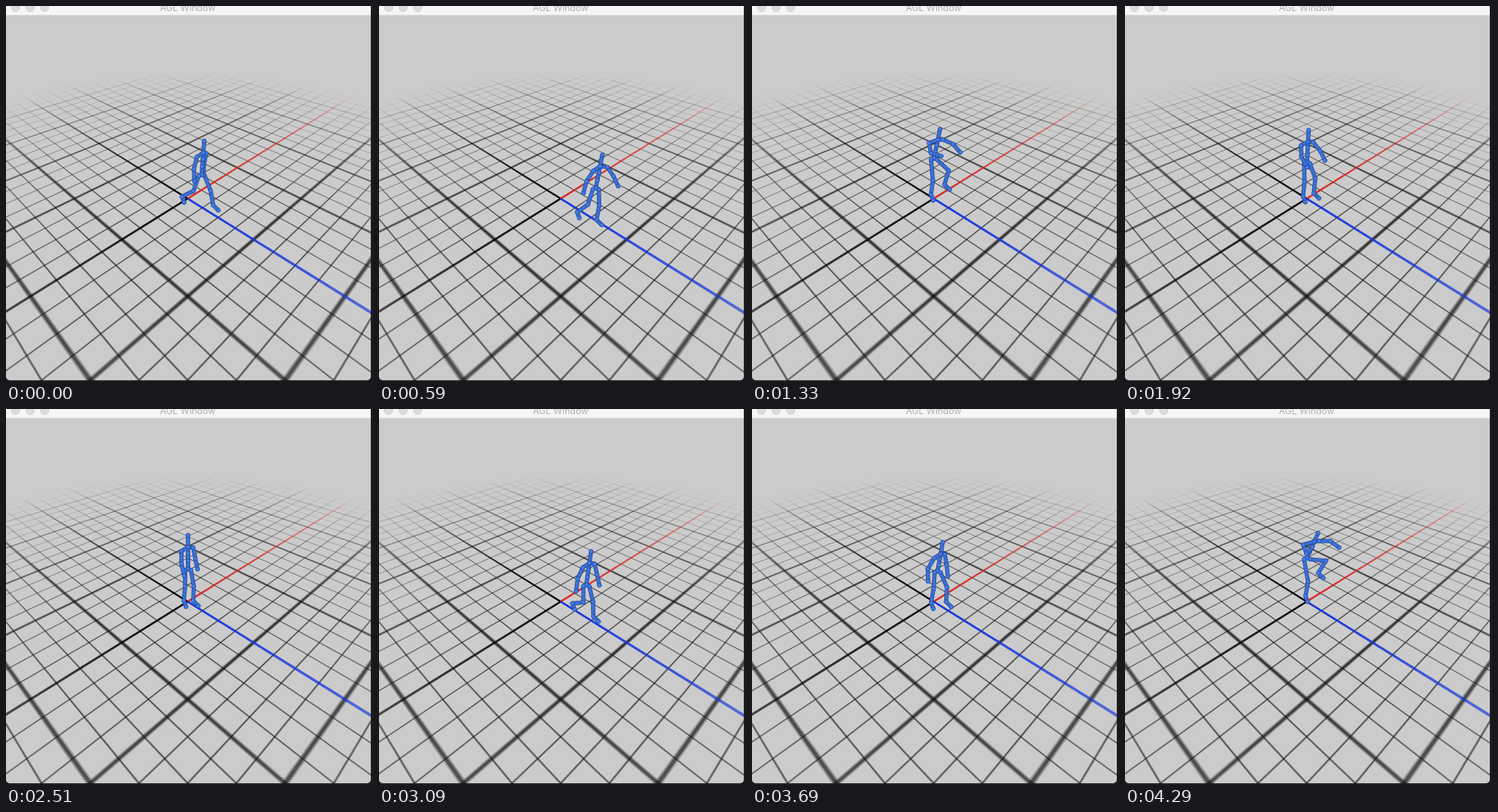
These frames come from a looping animation (502 px wide and 514 px high, 4.39 s). An HTML page with a canvas:

```html
<!DOCTYPE html>
<html lang="en">
<head>
<meta charset="utf-8">
<title>AGL Window</title>
<style>
  html, body { margin: 0; width: 100%; height: 100%; overflow: hidden; background: #cbcbcb; }
  canvas { display: block; }
</style>
</head>
<body>
<canvas id="stage" width="502" height="514"></canvas>
<script>
const W = 502, H = 514, LOOP = 4390, STEP = 147.5, LAST_STEP = 29;
const RADIUS = 5, TAU = Math.PI * 2;
const ctx = document.getElementById('stage').getContext('2d');

function makeLayer(paint) {
  const layer = document.createElement('canvas');
  layer.width = W;
  layer.height = H;
  paint(layer.getContext('2d'));
  return layer;
}

// Ground plane to screen: a runs right and down, b runs left and down.
function project(a, b) {
  const scale = 1 / (1 - 0.1395 * (a + b));
  return [248.5 + 77.5 * (a - b) * scale, -82 + 346 * scale];
}

function polygon(g, points) {
  g.beginPath();
  points.forEach(p => g.lineTo(...p));
  g.fill();
}

// A strip on the ground that fades with its distance from the origin.
function groundLine(g, k, alongA, from, to, width, rgb, strength) {
  const at = (t, side = 0) => alongA ? project(t, k + side) : project(k + side, t);
  const start = at(from), end = at(to);
  const length = Math.hypot(end[0] - start[0], end[1] - start[1]);
  const gradient = g.createLinearGradient(...start, ...end);
  const stops = 24;
  for (let i = 0; i <= stops; i++) {
    const t = from + (to - from) * i / stops;
    const p = at(t);
    const offset = Math.hypot(p[0] - start[0], p[1] - start[1]) / length;
    const fade = Math.max(0, 1 - (Math.hypot(k, t) / RADIUS) ** 1.3);
    gradient.addColorStop(Math.min(1, offset), `rgba(${rgb},${(fade * strength).toFixed(3)})`);
  }
  g.fillStyle = gradient;
  const h = width / 2;
  polygon(g, [at(from, -h), at(to, -h), at(to, h), at(from, h)]);
}

function drawGrid(g) {
  // A wide pale strip under a narrow one gives the soft edge.
  const line = (k, width, strength) => {
    const reach = Math.sqrt(RADIUS * RADIUS - k * k);
    for (const alongA of [true, false]) {
      for (const [spread, share] of [[1.5, 0.4], [0.8, 0.8]]) {
        groundLine(g, k, alongA, -reach, Math.min(reach, 4 - k),
          width * spread, '16,16,16', strength * share);
      }
    }
  };
  for (let i = -19; i < 20; i++) {
    if (i % 4) line(i / 4, 0.0115, 0.9);
  }
  for (let k = -4; k <= 4; k++) {
    if (k) line(k, 0.031, 1);
  }
}

function drawAxes(g) {
  groundLine(g, 0, true, -RADIUS, 0, 0.03, '5,5,5', 1);
  groundLine(g, 0, false, 0, 4, 0.03, '5,5,5', 1);
  groundLine(g, 0, false, -RADIUS, 0, 0.032, '215,40,36', 1);
  groundLine(g, 0, true, 0, 4, 0.034, '20,52,220', 1);
}

function drawWindow(g) {
  g.fillStyle = '#f5f5f5';
  g.fillRect(0, 0, W, 12);
  g.fillStyle = '#dedede';
  g.fillRect(0, 12, W, 1);
  g.fillStyle = '#dcdcdc';
  g.strokeStyle = '#cccccc';
  for (const x of [13, 33, 53]) {
    g.beginPath();
    g.arc(x, 2, 5.5, 0, TAU);
    g.fill();
    g.stroke();
  }
  g.fillStyle = '#b0b0b0';
  g.font = '12.5px Inter, "Liberation Sans", sans-serif';
  g.textAlign = 'center';
  g.fillText('AGL Window', 248.5, 7);
  // Dark desktop around the rounded window
  g.fillStyle = '#1c1c1c';
  g.beginPath();
  g.rect(0, 0, W, H);
  g.roundRect(0, -10, 499, 523, 5);
  g.fill('evenodd');
}

const background = makeLayer(g => {
  g.fillStyle = '#cbcbcb';
  g.fillRect(0, 0, W, H);
  g.filter = 'blur(0.45px)';
  g.drawImage(makeLayer(drawGrid), 0, 0);
  g.filter = 'none';
  drawAxes(g);
  drawWindow(g);
});

// travel: distance walked; raise: arms and knee lifted; crouch: hunched, arms apart.
// Keys on neighbouring steps make a hard cut.
const keys = [
  { step: 0, travel: 2.2, raise: 0, crouch: 0 },
  { step: 4, travel: 5.6, raise: 0, crouch: 0 },
  { step: 5, travel: 0.3, raise: 0, crouch: 1 },
  { step: 9, travel: 0, raise: 0.7, crouch: 0 },
  { step: 17, travel: 0, raise: 0, crouch: 0 },
  { step: 23, travel: 6.1, raise: 0, crouch: 0 },
  { step: 24, travel: -0.7, raise: 0, crouch: 1 },
  { step: 28, travel: 4.4, raise: 0, crouch: 0 },
  { step: 29, travel: 0, raise: 1, crouch: 0 }
];

function moodAt(step) {
  const next = keys.findIndex(key => key.step >= step);
  const to = keys[next], from = keys[Math.max(0, next - 1)];
  const mix = to === from ? 1 : (step - from.step) / (to.step - from.step);
  const blend = name => from[name] + (to[name] - from[name]) * mix;
  return { travel: blend('travel'), raise: blend('raise'), crouch: blend('crouch') };
}

const add = ([x, y], dx, dy) => [x + dx, y + dy];

// Next joint along a bone; the angle is in degrees from straight down, positive to the right.
function bone(from, degrees, length) {
  const angle = degrees * Math.PI / 180;
  return add(from, Math.sin(angle) * length, Math.cos(angle) * length);
}

function chain(root, ...bones) {
  const joints = [root];
  for (const [angle, length] of bones) joints.push(bone(joints.at(-1), angle, length));
  return joints;
}

function figure({ travel, raise, crouch }) {
  const leap = raise * raise;
  const swing = Math.sin(travel * Math.PI / 4);
  const lift = Math.max(0, Math.sin(travel * Math.PI / 7.6)) ** 3;

  const pelvis = [249 + 8.5 * travel, 219 + 5.4 * travel - 15 * raise];
  const lean = 2 * travel + 24 * leap + 12 * crouch;
  const neck = bone(pelvis, 180 - lean, 30 - 6 * raise - 8 * crouch);
  const head = bone(neck, 180 - lean, 16 - 3 * leap);

  const nearThigh = 10 * leap - 20 * swing * swing;
  const nearShin = nearThigh - 5 - 15 * leap - 80 * lift;
  const farThigh = 10 + 12 * Math.sin(travel * Math.PI / 4.5) + 75 * leap + 12 * crouch;
  const farShin = farThigh - 12 - 105 * leap - 20 * crouch;

  const nearLeg = chain(add(pelvis, -4, 2), [nearThigh, 22 + 9 * raise], [nearShin, 20 - 5 * lift]);
  const farLeg = chain(add(pelvis, 4, 2), [farThigh, 22], [farShin, 20]);
  nearLeg.push(add(nearLeg.at(-1), 3, 8));
  farLeg.push(add(farLeg.at(-1), 7, 7));

  const nearArm = chain(add(neck, -9 - 6 * leap, 6 - 2 * raise),
    [-6 * travel + 20 * leap - 36 * crouch, 17 - 4 * raise],
    [13 - 5 * travel + 125 * leap - 12 * crouch, 17 - 5 * leap]);
  const farArm = chain(add(neck, 7 - 3 * swing, 1 - 2 * leap),
    [11 - 24 * swing + 79 * raise + 12 * crouch, 15],
    [12 - 14 * swing + 42 * raise, 15]);

  const spine = t => add(pelvis, (neck[0] - pelvis[0]) * t, (neck[1] - pelvis[1]) * t);
  return [
    [pelvis, ...farLeg],
    [neck, ...farArm],
    [pelvis, spine(0.35), spine(0.7), neck, head],
    [pelvis, ...nearLeg],
    [neck, ...nearArm]
  ];
}

function drawLimb(points) {
  ctx.lineCap = ctx.lineJoin = 'round';
  for (const [width, color] of [[5.6, '#213f82'], [4.2, '#3a70d8']]) {
    ctx.lineWidth = width;
    ctx.strokeStyle = color;
    ctx.beginPath();
    points.forEach(p => ctx.lineTo(...p));
    ctx.stroke();
  }
  ctx.lineWidth = 0.8;
  ctx.strokeStyle = '#254a9c';
  ctx.fillStyle = '#427de9';
  for (const [x, y] of points) {
    ctx.beginPath();
    ctx.arc(x, y, 2.8, 0, TAU);
    ctx.fill();
    ctx.stroke();
  }
}

const begin = performance.now();

function render() {
  const time = (performance.now() - begin) % LOOP;
  const step = Math.min(LAST_STEP, Math.floor((time + 8) / STEP));
  ctx.drawImage(background, 0, 0);
  figure(moodAt(step)).forEach(drawLimb);
  requestAnimationFrame(render);
}
render();
</script>
</body>
</html>
```
